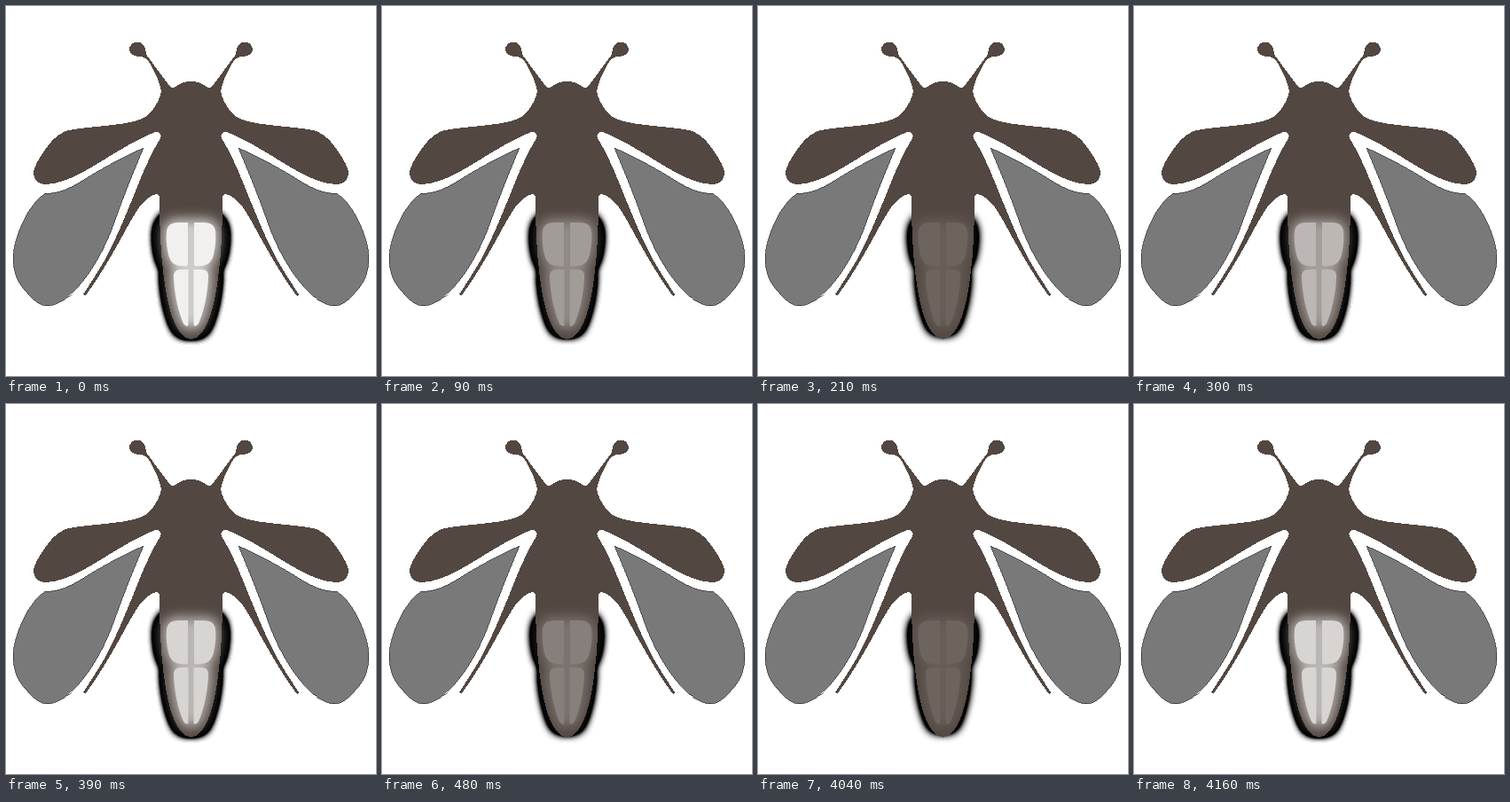
These frames come from a looping animation (417 by 417 pixels, 4.19 s). An HTML page:

```html
<!DOCTYPE html>
<html lang="en">
<head>
<meta charset="utf-8">
<title>Firefly</title>
<style>
  html, body { margin: 0; width: 100%; height: 100%; overflow: hidden; background: #fff; }
  svg { display: block; width: 100vw; height: 100vh; }
  .body { fill: #524741; shape-rendering: crispEdges; }
  .wing { fill: #797979; stroke: #2b2b2b; stroke-width: .7; shape-rendering: crispEdges; }
  #halo { fill: #000; stroke: #000; stroke-width: 16; stroke-linejoin: round; }
  #glow { fill: #fff; stroke: #fff; stroke-width: 8; stroke-linejoin: round; opacity: .72; }
</style>
</head>
<body>
<svg viewBox="0 0 417 417">
  <defs>
    <filter id="spread" filterUnits="userSpaceOnUse" x="130" y="200" width="157" height="210">
      <feGaussianBlur stdDeviation="6"/>
      <feComponentTransfer><feFuncA id="gain" type="linear" slope="18"/></feComponentTransfer>
    </filter>
    <filter id="soft" filterUnits="userSpaceOnUse" x="130" y="200" width="157" height="210">
      <feGaussianBlur stdDeviation="7"/>
    </filter>

    <path id="half" d="M209 85 C202 85 196 87 191 91 Q188 94 185 91
      C177 80 167 67 159 56 C157 52 158 48 155 44 C152 40 147 40 143 42
      C139 45 138 49 140 52 C142 56 147 57 152 57 C158 58 161 62 164 68
      C169 77 173 86 175 96 C174 103 169 113 163 120
      C157 127 147 130 135 132 C110 136 82 137 67 141
      C55 146 48 156 42 165 C37 172 32 181 31 187 C31 194 34 201 46 201
      C74 199 101 178 129 162 C144 153 156 147 168 142
      C173 141 176 145 174 149 C162 168 152 193 143 216 C133 240 124 263 112 285
      C103 301 94 314 87 325 L89 327 C99 314 109 298 120 279
      C131 261 140 241 150 227 C157 218 164 213 169 212 Q173 212 173 217
      C173 246 174 277 178 307 C182 337 190 374 209 376 Z"/>
    <path id="wing" d="M155 160 C132 170 110 182 86 197 C70 207 57 212 45 211
      C29 220 14 248 9 274 C6 296 12 309 20 319 C29 329 37 339 48 338
      C58 337 69 330 77 321 C97 301 113 270 122 244 C131 218 144 186 155 160 Z"/>
    <g id="cell">
      <path d="M205 244 L205 292 Q203 294 199 293 C190 293 185 289 183 280
        C181 271 180 263 181 254 Q182 244 194 244 Z"/>
      <path d="M205.500 297 L205.500 360 Q203 362 200 358 C194 344 190 326 189 307
        Q188 297 196 297 Z"/>
    </g>
    <g id="cells">
      <use href="#cell"/>
      <use href="#cell" transform="matrix(-1 0 0 1 417 0)"/>
    </g>
  </defs>

  <rect width="417" height="417" fill="#fff"/>
  <g id="halo" filter="url(#spread)"><use href="#cells"/></g>
  <use href="#wing" class="wing"/>
  <use href="#wing" class="wing" transform="matrix(-1 0 0 1 417 0)"/>
  <use href="#half" class="body"/>
  <use href="#half" class="body" transform="matrix(-1 0 0 1 417 0)"/>
  <g id="light">
    <g id="glow" filter="url(#soft)"><use href="#cells"/></g>
    <use href="#cells" fill="#f2f0ef"/>
  </g>
</svg>
<script>
  const LOOP = 4190, STEP = 30, RAMP = 180;
  const $ = id => document.getElementById(id);
  const halo = $('halo'), gain = $('gain'), light = $('light');

  // Two triangular flashes, peaking at 0 and 360 ms, then a dark rest.
  function level(t) {
    const toPeak = Math.min(t, Math.abs(t - 2 * RAMP), LOOP - t);
    return Math.max(0, 1 - toPeak / RAMP);
  }

  let shown = -1;
  function draw(now) {
    const t = now % LOOP;
    // The rest lasts 3500 ms, so steps after it sit on a shifted grid.
    const start = t < 540 ? 0 : t < 4040 ? 540 : 4040;
    const held = start === 540 ? 540 : start + Math.floor((t - start) / STEP) * STEP;
    const v = level(held);
    if (v !== shown) {
      shown = v;
      halo.style.visibility = v > 0 ? 'visible' : 'hidden';
      gain.setAttribute('slope', 2 + 16 * v);
      light.setAttribute('opacity', v);
    }
  }

  const origin = performance.now();
  function tick() {
    draw(performance.now() - origin);
    requestAnimationFrame(tick);
  }
  tick();
</script>
</body>
</html>
```
